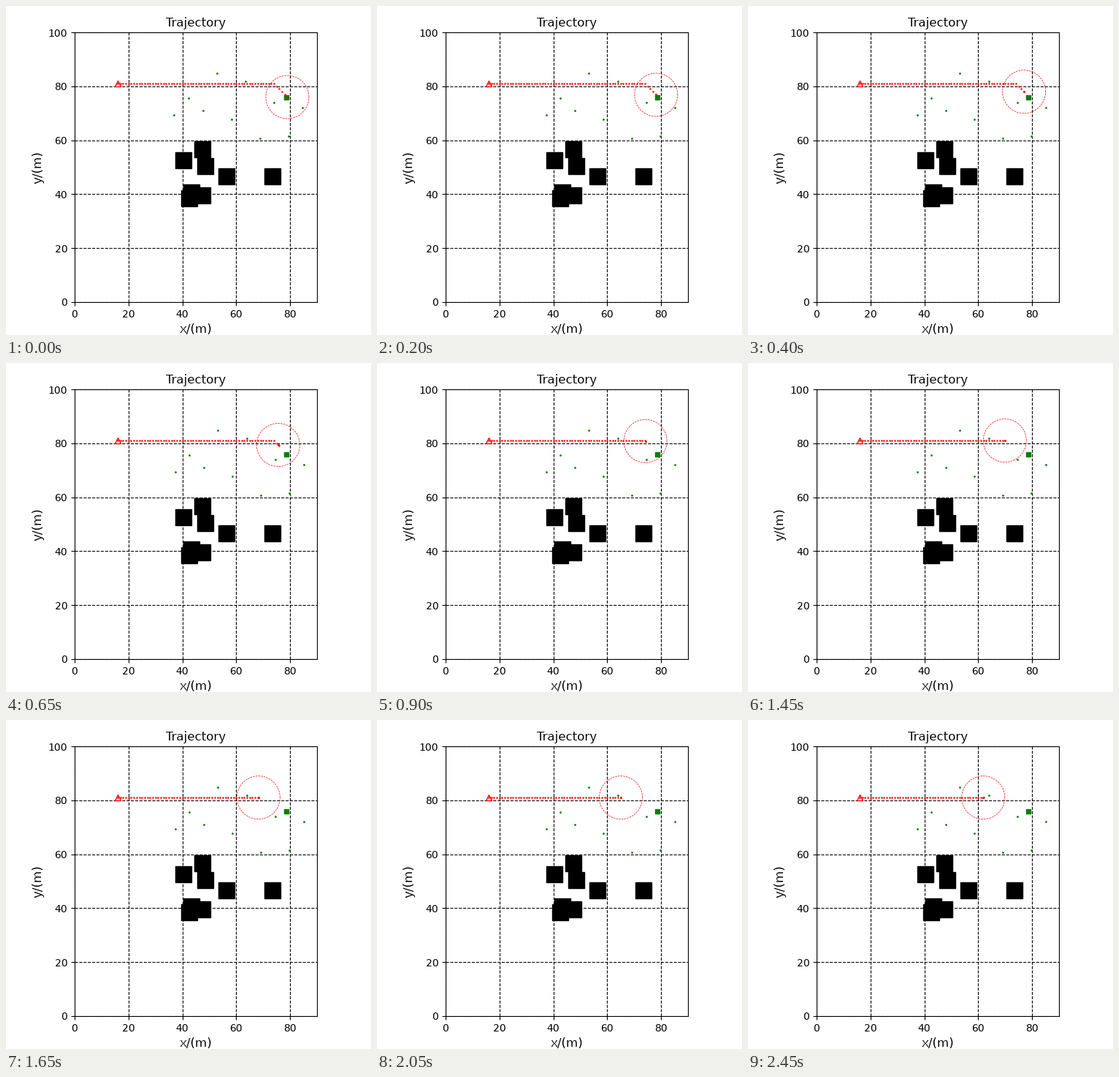
Animation of 500x450 px, one loop 2500 ms. Source, as a matplotlib script:

```python
import math

import matplotlib.pyplot as plt
import numpy as np
from matplotlib.animation import FuncAnimation

FRAMES, INTERVAL = 50, 50
START, CORNER, GOAL = (79, 76), (74, 81), (16, 81)
STEP = 0.4          # distance travelled per frame
RANGE = 8           # sensor radius

BLOCKS = [(40.4, 52.5), (47.4, 56.6), (48.6, 50.4), (56.4, 46.6),
          (73.5, 46.6), (43.5, 40.6), (42.6, 38.4), (47.4, 39.5)]

# Path nodes, one per unit of x, from the start to the goal.
node_x = np.arange(START[0], GOAL[0] - 1, -1)
node_y = np.minimum(START[1] + START[0] - node_x, GOAL[1])

# Scattered points: a slow wave with a zigzag that swells in the middle.
k = np.arange(10)
point_x = 37 + 5.3 * k
point_y = (72 + 5.5 * np.cos(2 * np.pi * (k - 3) / 9)
           - 9 * np.sin(np.pi * k / 10) * (-1.0) ** k)

angle = np.linspace(0, 2 * np.pi, 100)
ring_x, ring_y = RANGE * np.cos(angle), RANGE * np.sin(angle)

plt.rcParams["font.family"] = "DejaVu Sans"
plt.rcParams["text.hinting"] = "default"
fig = plt.figure(figsize=(5, 4.5), dpi=100)
ax = fig.add_axes([0.188, 0.1, 0.664, 0.82])
ax.set(xlim=(0, 90), ylim=(0, 100))
ax.set_title("Trajectory", fontsize=12)
ax.set_xlabel("x/(m)", fontsize=12)
ax.set_ylabel("y/(m)", fontsize=12)
ax.set_xticks(range(0, 90, 20))
ax.set_axisbelow(True)
ax.grid(color="k", linestyle="--", linewidth=0.8)

ax.plot(*zip(*BLOCKS), "ks", ms=15.6)
ax.plot(*GOAL, "r^", ms=6, mfc="none")
ax.plot(78.7, 76, "gs", ms=4)
points, = ax.plot([], [], "g.", ms=2)
path, = ax.plot([], [], "r.", ms=1.6)
robot, = ax.plot([], [], "r.", ms=2.4)
scan, = ax.plot([], [], "r--", lw=0.5)


def position(dist):
    """Point at the given distance along the diagonal, then the straight."""
    side = dist / math.sqrt(2)
    if side < START[0] - CORNER[0]:
        return START[0] - side, START[1] + side
    return CORNER[0] - (dist - math.dist(START, CORNER)), CORNER[1]


def draw(i):
    x, y = position(STEP * max(i - 1, 0))
    points.set_data(point_x + 0.35 * min(i, 1), point_y)
    ahead = node_x <= x + 0.5
    path.set_data(node_x[ahead], node_y[ahead])
    robot.set_data([x], [y])
    scan.set_data(x + ring_x, y + ring_y)
    return points, path, robot, scan


anim = FuncAnimation(fig, draw, frames=FRAMES, interval=INTERVAL, repeat=True)
plt.show()
```
